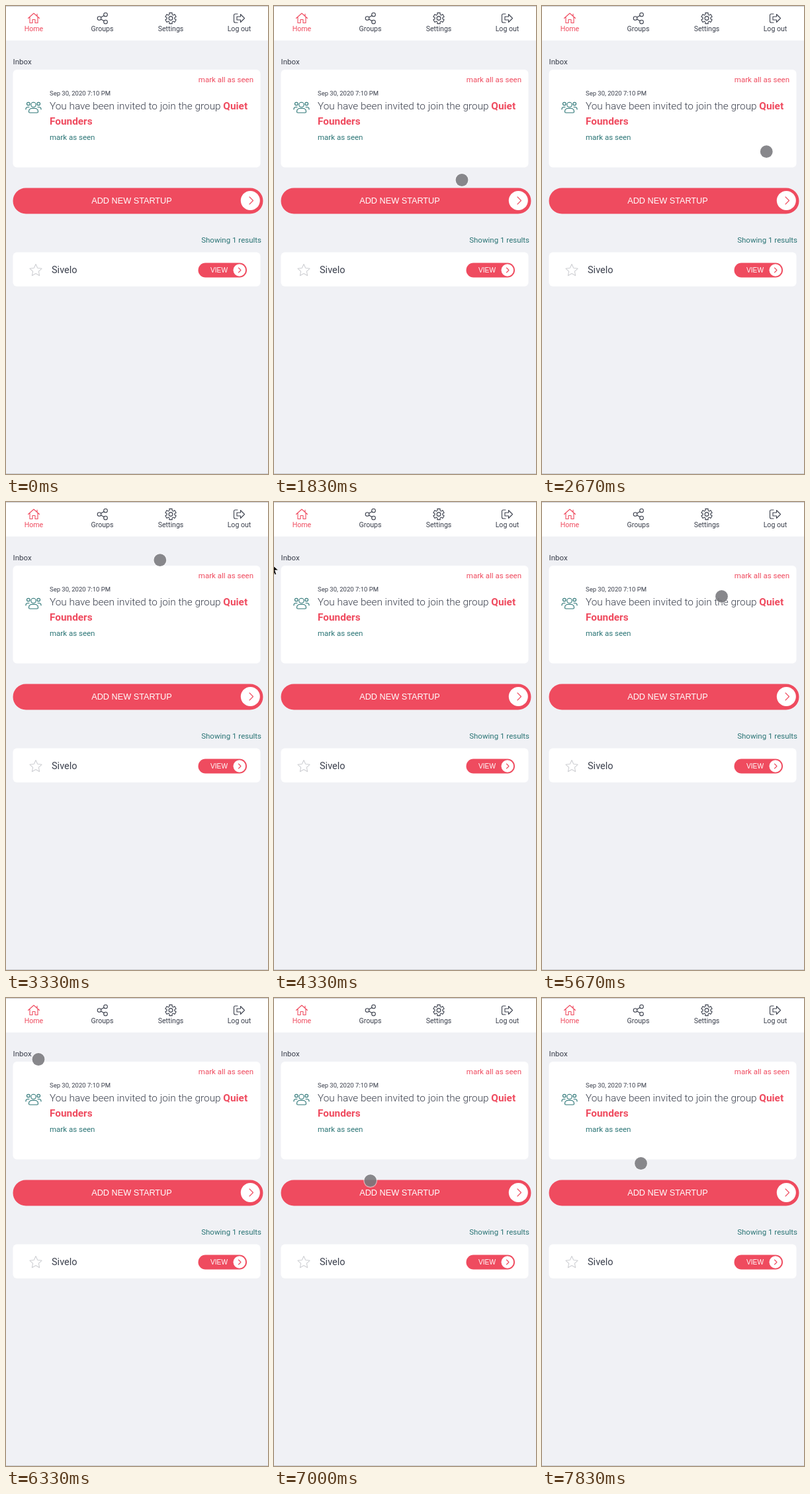
An HTML page that plays this animation: 396 px wide and 706 px high, repeating every 8000 ms.

```html
<!DOCTYPE html>
<html lang="en">
<head>
<meta charset="utf-8">
<title>Inbox</title>
<style>
  html, body { margin: 0; height: 100%; overflow: hidden; background: #f0f1f5; }
  svg { display: block; }
  text { font: 11.5px Roboto, sans-serif; fill: #3a3f4c; }
  .nav text { font-size: 10.6px; text-anchor: middle; }
  .lead { font-size: 15.37px; font-weight: 300; }
  .button { font-family: "Liberation Sans", Arial, sans-serif; fill: #fff; text-anchor: middle; }
  text.red, tspan { fill: #ef4b5f; }
  tspan { font-weight: 700; }
  text.teal { fill: #2a7475; }
  .line { fill: none; stroke: #3a3f4c; stroke-width: 1.1; stroke-linejoin: round; stroke-linecap: round; }
  .line.red { stroke: #ef4b5f; }
  .line.teal { stroke: #2a7475; }
</style>
</head>
<body>
<svg width="396" height="706" viewBox="0 0 396 706">
  <rect width="396" height="706" fill="#f0f1f5"/>
  <rect width="396" height="52" fill="#fff"/>
  <path d="M0 .5H396M0 705.5H396" stroke="#cbccd0"/>

  <g class="nav">
    <text class="red" x="42" y="37.6">Home</text>
    <text x="145.5" y="37.6">Groups</text>
    <text x="249" y="37.6">Settings</text>
    <text x="352.5" y="37.6">Log out</text>
  </g>
  <path class="line red" d="M33.5 18.5L42 11l8.5 7.5M36 17v8.500h4v-5h4v5h4V17M47 15v-3"/>
  <g class="line">
    <circle cx="141" cy="18.5" r="2.8"/>
    <circle cx="150.5" cy="13" r="2.8"/>
    <circle cx="150.5" cy="24" r="2.8"/>
    <path d="M143.5 17l4.600-2.600M143.5 20l4.600 2.600"/>
    <circle cx="249" cy="18.5" r="2.9"/>
    <path id="gear"/>
    <path d="M350 12h-3.500q-2 0-2 2v9q0 2 2 2h3.500M349 16h5.500v-3.500l6 6-6 6V21H349z"/>
  </g>

  <text x="10.5" y="87.5">Inbox</text>
  <rect x="10.5" y="96" width="374" height="147.5" rx="6" fill="#fff"/>
  <text class="red" x="374" y="115" text-anchor="end">mark all as seen</text>
  <text x="66" y="135.4" style="font-size:9.5px">Sep 30, 2020 7:10 PM</text>
  <text class="lead" x="66" y="155.5">You have been invited to join the group <tspan>Quiet</tspan></text>
  <text class="lead" x="66" y="178.5"><tspan>Founders</tspan></text>
  <text class="teal" x="66" y="202" font-weight="300">mark as seen</text>
  <g class="line teal">
    <circle cx="41.5" cy="149" r="3.7"/>
    <circle cx="33.8" cy="147.500" r="2.300"/>
    <circle cx="49.2" cy="147.500" r="2.300"/>
    <path d="M36 161q-1.500 0-1.500-1.500 0-5 5-5h4q5 0 5 5 0 1.500-1.500 1.500zM30 156v-.500q0-3 3-3h2M53 156v-.500q0-3-3-3h-2"/>
  </g>

  <rect x="10.5" y="274.5" width="378" height="39" rx="19.5" fill="#ef4b5f"/>
  <text class="button" x="190" y="298" style="font-size:12.7px">ADD NEW STARTUP</text>
  <circle cx="369.3" cy="293.5" r="14.5" fill="#fff"/>
  <path class="line red" d="M368 288l5.500 5.500-5.500 5.500"/>

  <text class="teal" x="386" y="357" text-anchor="end">Showing 1 results</text>
  <rect x="10.5" y="371.5" width="374" height="51.5" rx="6" fill="#fff"/>
  <path id="star" class="line" style="stroke:#cfd0d4"/>
  <text x="69" y="403" style="font-size:14.5px">Sivelo</text>
  <rect x="290.5" y="387.5" width="73.500" height="22" rx="11" fill="#ef4b5f"/>
  <text class="button" x="322" y="402" style="font-size:10.2px">VIEW</text>
  <circle cx="352.8" cy="398.5" r="9.3" fill="#fff"/>
  <path class="line red" d="M351.5 395l3.500 3.500-3.500 3.500"/>

  <circle id="dot" r="9.4" fill="#77777c" fill-opacity=".88" stroke="#fff" stroke-width="2" stroke-opacity=".6" paint-order="stroke"/>
  <path id="arrow" transform="translate(-5.5 92)" d="M0 0v16l4-4 3 6 2-1-2-6h5z" stroke="#fff" stroke-width=".8"/>
</svg>
<script>
const el = id => document.getElementById(id);

// n-fold closed outline; the shape lists [angle in degrees, radius] of one part
function radial(cx, cy, n, shape) {
  const points = [];
  for (let i = 0; i < n; i++) {
    for (const [deg, r] of shape) {
      const a = (deg - 90 + i * 360 / n) * Math.PI / 180;
      points.push(`${cx + r * Math.cos(a)} ${cy + r * Math.sin(a)}`);
    }
  }
  return `M${points.join('L')}z`;
}

el('gear').setAttribute('d', radial(249, 18.5, 6, [[-20, 6], [-15, 8.4], [15, 8.4], [20, 6]]));
el('star').setAttribute('d', radial(45, 399, 5, [[0, 9.5], [36, 4.6]]));

// Each pointer stroke is one cubic curve, run from its first to its last tick and then held
const fps = 6, duration = 8000;
const strokes = [
  { from: 7, to: 11, x: [368, 335, 310, 284], y: [386, 330, 285, 262.5] },
  { from: 14, to: 21, x: [284, 365, 418, 129], y: [262.5, 240, 100, 68] },
  { from: 26, to: 30, x: [-20, 60, 100, 174], y: [100, 110, 260, 260] },
  { from: 30, to: 37, x: [174, 380, 310, 43], y: [260, 280, 45, 80] },
  { from: 38, to: 43, x: [49, -60, 220, 130], y: [92.5, 200, 350, 218].map((v, i) => i === 1 ? 300 : v) },
  { from: 44, to: 47, x: [130, 90, 125, 149.5], y: [218, 215, 255, 249.5] }
];

const cubic = ([a, b, c, d], u) => {
  const v = 1 - u;
  return v * v * v * a + 3 * v * v * u * b + 3 * v * u * u * c + u * u * u * d;
};

const show = (node, on) => node.setAttribute('visibility', on ? 'visible' : 'hidden');

function draw(ms) {
  const tick = Math.floor((ms % duration + 5) * fps / 1000) % (fps * duration / 1000);
  const outside = tick < 7 || (tick > 21 && tick < 27);
  show(el('dot'), !outside);
  show(el('arrow'), tick === 26);
  if (outside) return;
  const s = strokes.findLast(s => s.from <= tick);
  const u = Math.min(1, (tick - s.from) / (s.to - s.from));
  el('dot').setAttribute('transform', `translate(${cubic(s.x, u)} ${cubic(s.y, u)})`);
}

const start = performance.now();
function loop() {
  draw(performance.now() - start);
  requestAnimationFrame(loop);
}
loop();
</script>
</body>
</html>
```
